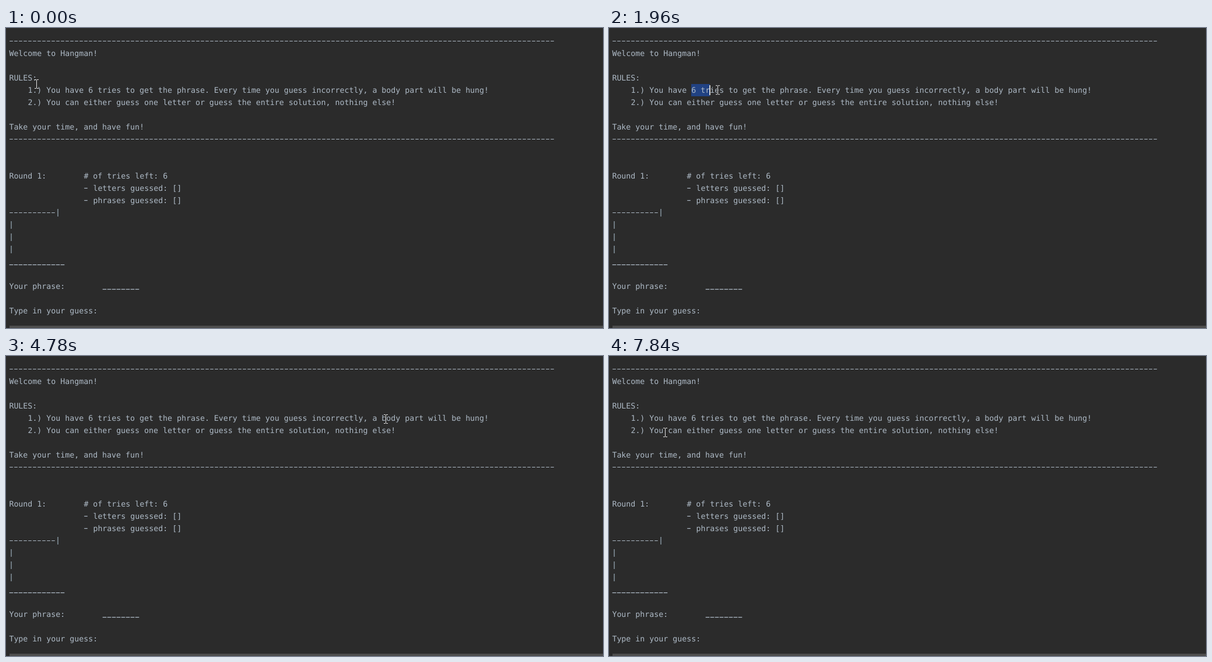
Write an HTML page that moves like this. It is 1024 px wide and 514 px high and loops after 7990 ms.

```html
<!DOCTYPE html>
<html lang="en">
<head>
<meta charset="utf-8">
<title>Hangman</title>
<style>
  html, body { margin: 0; width: 100%; height: 100%; overflow: hidden; background: #2b2b2b; }
  svg { display: block; width: 1024px; height: 514px; }
  text {
    font: 13.288px "DejaVu Sans Mono", "Noto Sans Mono", monospace;
    fill: #aebac6;
    white-space: pre;
    text-rendering: geometricPrecision;
  }
  line { stroke: #aebac6; stroke-width: 1.2; }
  .hyphen { stroke-dasharray: 5.6 2.4; }
  .blank { stroke-dasharray: 6.6 1.4; }
  .pole { stroke: #9db0bd; }
  #pointer path { fill: none; stroke: #e4e4e4; }
  #pointer .edge { stroke: #2b2b2b; stroke-width: 2.4; }
</style>
</head>
<body>
<svg viewBox="0 0 1024 514">
  <rect width="1024" height="514" fill="#2b2b2b"/>
  <rect x="6" y="510" width="1018" height="4" fill="#4d4d4d"/>
  <rect id="selection" y="96" height="21" fill="#214283"/>
  <g id="screen"></g>
  <rect id="caret" y="98" width="2" height="17" fill="#d0d0d0"/>
  <g id="pointer">
    <path class="edge" d="M0-7V7"/>
    <path d="M-3.5-7.5H-.5M.5-7.5H3.5M0-7V7M-3.5 7.5H-.5M.5 7.5H3.5"/>
  </g>
</svg>
<script>
const LOOP = 7990, CELL = 8, LEFT = 5, LINE = 21, FIRST = 27;
const byId = id => document.getElementById(id);
const colX = col => LEFT + col * CELL;
const colAt = x => Math.round((x - LEFT) / CELL);
const rowY = row => FIRST + row * LINE;

function add(tag, attrs, content = "") {
  const el = document.createElementNS("http://www.w3.org/2000/svg", tag);
  for (const key in attrs) el.setAttribute(key, attrs[key]);
  el.textContent = content;
  byId("screen").append(el);
}
const stroke = (kind, x1, x2, y1, y2) => add("line", { class: kind, x1, x2, y1, y2 });
const write = (row, col, words) => add("text", { x: colX(col) + 0.4, y: rowY(row) }, words);
function hyphens(row, col, count) {
  const y = rowY(row) - 4.5;
  stroke("hyphen", colX(col) + 1.2, colX(col + count) - 1.2, y, y);
}
function blanks(row, col, count) {
  const y = rowY(row) + 0.6;
  stroke("blank", colX(col) + 0.7, colX(col + count) - 0.7, y, y);
}
function pole(row, col) {
  const x = colX(col) + 4;
  stroke("pole", x, x, rowY(row) - 11, rowY(row) + 2);
}

hyphens(0, 0, 117);
write(1, 0, "Welcome to Hangman!");
write(3, 0, "RULES:");
write(4, 4, "1.) You have 6 tries to get the phrase. Every time you guess incorrectly, a body part will be hung!");
write(5, 4, "2.) You can either guess one letter or guess the entire solution, nothing else!");
write(7, 0, "Take your time, and have fun!");
hyphens(8, 0, 117);

write(11, 0, "Round 1:");
write(11, 16, "# of tries left: 6");
["letters", "phrases"].forEach((kind, i) => {
  hyphens(12 + i, 16, 1);
  write(12 + i, 18, kind + " guessed: []");
});
hyphens(14, 0, 10);
pole(14, 10);
for (let row = 15; row < 18; row++) pole(row, 0);
blanks(18, 0, 12);
write(20, 0, "Your phrase:");
blanks(20, 20, 8);
write(22, 0, "Type in your guess:");

// The pointer follows quadratic curves, each from where the last one ended,
// and is seen only once every STEP ms.
const STEP = 133;
const home = [52.5, 96];
const moves = [
  { start: 150, end: 1140, bend: [-2.4, 128], to: [143.5, 105] },
  { start: 1720, end: 2250, bend: [193.5, 106], to: [196.5, 107] },
  { start: 2750, end: 3530, bend: [310, 70], to: [429.5, 106] },
  { start: 3680, end: 4080, bend: [458, 107], to: [560.5, 109] },
  { start: 4390, end: 4780, bend: [698.5, 110], to: [651.5, 108] },
  { start: 5760, end: 6020, bend: [690, 125], to: [741, 111] },
  { start: 7120, end: 7840, bend: [5.6, 136.6], to: [96.5, 131] }
];

function progress({ start, end }, time) {
  const gaps = Math.round((end - start) / STEP);
  const passed = Math.floor((time - start) / (end - start) * gaps + 0.2);
  return Math.min(1, (passed + 1) / (gaps + 1));
}

function pointerAt(time) {
  let from = home;
  for (const move of moves) {
    if (time < move.start) break;
    const p = progress(move, time), q = 1 - p;
    from = from.map((v, i) => q * q * v + 2 * q * p * move.bend[i] + p * p * move.to[i]);
  }
  return from;
}

const DRAG = 1720, DRAG_END = 2250, DOUBLE_CLICK = 5630;
const clicks = [DRAG, 3530, 5360, DOUBLE_CLICK, 6840];
const word = { anchor: 80, caret: 84 };
const BLINK = 1530, LIT = 940;

function marksAt(time) {
  const press = clicks.findLast(click => click <= time);
  if (press === undefined) return { anchor: 0, caret: 0, lit: false };
  const lit = (time - press) % BLINK < LIT;
  if (press === DOUBLE_CLICK) return { ...word, lit };
  const anchor = colAt(pointerAt(press - 1)[0]);
  // Dragged text is marked one step behind the pointer.
  const caret = press === DRAG
    ? colAt(pointerAt(Math.min(time - STEP, DRAG_END))[0])
    : colAt(pointerAt(press)[0]);
  return { anchor: press === DRAG ? anchor : caret, caret, lit };
}

function draw(time) {
  const { anchor, caret, lit } = marksAt(time);
  byId("pointer").setAttribute("transform", `translate(${pointerAt(time).join(" ")})`);
  byId("caret").setAttribute("x", colX(caret) - 1);
  byId("caret").setAttribute("visibility", lit ? "visible" : "hidden");
  byId("selection").setAttribute("x", colX(anchor));
  byId("selection").setAttribute("width", (caret - anchor) * CELL);
}

const begin = performance.now();
function tick() {
  draw((performance.now() - begin) % LOOP);
  requestAnimationFrame(tick);
}
tick();
</script>
</body>
</html>
```
